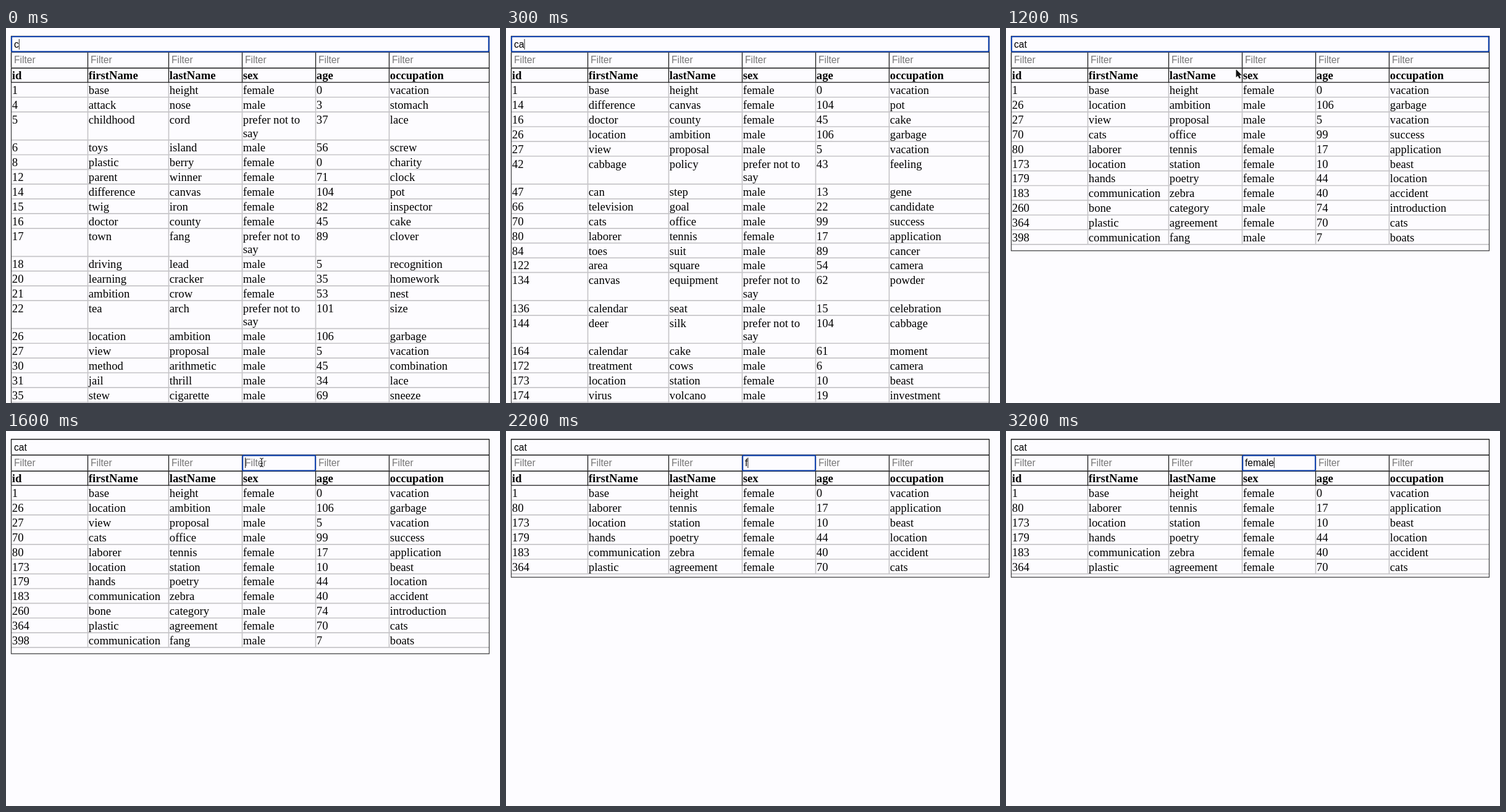
Recreate the animation shown at these times as an HTML page. Size 800 px wide and 608 px high, loop 3.4 s.

```html
<!DOCTYPE html>
<html lang="en">
<head>
<meta charset="utf-8">
<title>Table filter</title>
<style>
  html, body { margin: 0; width: 100%; height: 100%; overflow: hidden; background: #fdfcff; }
  svg { display: block; width: 800px; height: 608px; }
  text { font: 18.7px "Liberation Serif", Times, serif; white-space: pre; }
  .head { font-weight: bold; }
  .field { font: 15.6px "Liberation Sans", Arial, sans-serif; }
  .hint { fill: #757575; }
  path { fill: none; }
  .grid { stroke: #c6c5c8; stroke-width: 1.7; }
  .edge { stroke: #3c3c3e; stroke-width: 1.2; }
  .dark { stroke: #161616; stroke-width: 1.3; }
  .caret { stroke: #222; stroke-width: 1; }
  .focus { fill: none; stroke: #1546b0; stroke-width: 2.1; }
</style>
</head>
<body>
<svg id="stage" viewBox="0 0 800 608"></svg>
<script>
const LOOP = 3400, LEFT = 8.5, RIGHT = 782.5, TOP = 88.4;
const ROW = 23.87, LINE = 21.6, EST_ROW = 24.8;
const cols = [8.5, 132.5, 263.5, 382.5, 501.5, 620.5];
const names = ['id', 'firstName', 'lastName', 'sex', 'age', 'occupation'];
const sexes = { f: 'female', m: 'male', p: 'prefer not to say' };
const people = `1 base height f 0 vacation
4 attack nose m 3 stomach
5 childhood cord p 37 lace
6 toys island m 56 screw
8 plastic berry f 0 charity
12 parent winner f 71 clock
14 difference canvas f 104 pot
15 twig iron f 82 inspector
16 doctor county f 45 cake
17 town fang p 89 clover
18 driving lead m 5 recognition
20 learning cracker m 35 homework
21 ambition crow f 53 nest
22 tea arch p 101 size
26 location ambition m 106 garbage
27 view proposal m 5 vacation
30 method arithmetic m 45 combination
31 jail thrill m 34 lace
35 stew cigarette m 69 sneeze
42 cabbage policy p 43 feeling
47 can step m 13 gene
66 television goal m 22 candidate
70 cats office m 99 success
80 laborer tennis f 17 application
84 toes suit m 89 cancer
122 area square m 54 camera
134 canvas equipment p 62 powder
136 calendar seat m 15 celebration
144 deer silk p 104 cabbage
164 calendar cake m 61 moment
172 treatment cows m 6 camera
173 location station f 10 beast
174 virus volcano m 19 investment
179 hands poetry f 44 location
183 communication zebra f 40 accident
260 bone category m 74 introduction
364 plastic agreement f 70 cats
398 communication fang m 7 boats`.split('\n').map(line => {
  const person = line.split(' ');
  person[3] = sexes[person[3]];
  return person;
});

// [start time, value] steps
const search = [[0, 'c'], [100, 'ca'], [500, 'cat']];
const sexFilter = [[0, ''], [2200, 'f'], [2300, 'fe'], [2500, 'fem'],
  [2900, 'fema'], [3000, 'femal'], [3200, 'female']];
const caretOn = [[0, true], [1000, false], [1500, true], [1900, false], [2200, true]];
const pointer = [[0, null], [900, [611, 112]], [1000, [540, 99]], [1100, [445, 82]],
  [1200, [372.5, 67]], [1300, [400, 55, 'beam']], [1400, [414, 51, 'beam']], [2200, null]];
const at = (steps, t) => steps.findLast(s => s[0] <= t)[1];

const pen = document.createElement('canvas').getContext('2d');
pen.font = '15.6px "Liberation Sans", Arial, sans-serif';

const path = (cls, d) => `<path class="${cls}" d="${d}"/>`;
const text = (cls, x, y, str) => `<text class="${cls}" x="${x}" y="${y}">${str}</text>`;
const frame = (x, y, w, h) =>
  `<rect class="focus" x="${x}" y="${y}" width="${w}" height="${h}" rx="1.5"/>`;

function tableBody(rows) {
  let out = '', y = TOP, lines = '';
  for (const row of rows) {
    const wraps = row[3] === sexes.p;
    row.forEach((cell, i) => {
      const parts = wraps && i === 3 ? ['prefer not to', 'say'] : [cell];
      parts.forEach((s, n) => out += text('', cols[i] + 1.3, y + 18.8 + n * LINE, s));
    });
    y += wraps ? ROW + LINE : ROW;
    lines += `M${LEFT} ${y}H${RIGHT}`;
    if (y > 608) break;
  }
  for (const x of cols.slice(1)) lines += `M${x} ${TOP}V${y}`;
  const bottom = TOP + EST_ROW * rows.length;
  return path('grid', lines) + path('edge', `M${LEFT} ${TOP}V${bottom}H${RIGHT}V${TOP}`) + out;
}

function tableHead() {
  const bars = cols.map(x => `M${x} 40V64M${x} 65V88`).join('');
  return path('dark', `M8 13.5H783M8 39H783M8 65H783M8 88.2H783M8.5 13V38M782.5 13V88${bars}`) +
    names.map((name, i) => text('head', cols[i] + 1.3, 83, name)).join('');
}

function arrow(x, y) {
  return `<path transform="translate(${x} ${y})" d="M0 0V13L3 10.4L5.2 15L7.6 14L5.5 9.4H9.5Z"
    style="fill:#111;stroke:#fff;stroke-width:1;paint-order:stroke"/>`;
}

function beam(x, y) {
  const d = `M${x - 3} ${y - 7}Q${x} ${y - 7} ${x} ${y - 4}Q${x} ${y - 7} ${x + 3} ${y - 7}` +
    `M${x} ${y - 5}V${y + 5}M${x - 3} ${y + 7}Q${x} ${y + 7} ${x} ${y + 4}` +
    `Q${x} ${y + 7} ${x + 3} ${y + 7}M${x - 2} ${y + 2}H${x + 2}`;
  return `<path d="${d}" style="stroke:#222;stroke-width:1.1"/>`;
}

function scene(t) {
  const query = at(search, t), sex = at(sexFilter, t), onSex = t >= 1500;
  const rows = people.filter(p => p.some(c => c.includes(query)) && p[3].includes(sex));
  let out = tableBody(rows) + tableHead() + text('field', 13, 31.5, query);

  names.forEach((name, i) => {
    const typed = i === 3 && sex;
    out += text(typed ? 'field' : 'field hint', cols[i] + 4.5, 57, typed || 'Filter');
  });
  out += onSex ? frame(383.2, 39.6, 117.8, 24.6) : frame(9, 14, 772.8, 24.2);

  if (at(caretOn, t)) {
    const x = (onSex ? 387 : 13) + pen.measureText(onSex ? sex : query).width + 0.5;
    const y = onSex ? 43 : 18;
    out += path('caret', `M${x} ${y}v17`);
  }
  const p = at(pointer, t);
  if (p) out += p[2] ? beam(p[0], p[1]) : arrow(p[0], p[1]);
  return out;
}

const stage = document.getElementById('stage');
const start = performance.now();
let shown = '';
function draw() {
  const next = scene((performance.now() - start) % LOOP);
  if (next !== shown) stage.innerHTML = shown = next;
  requestAnimationFrame(draw);
}
draw();
</script>
</body>
</html>
```
